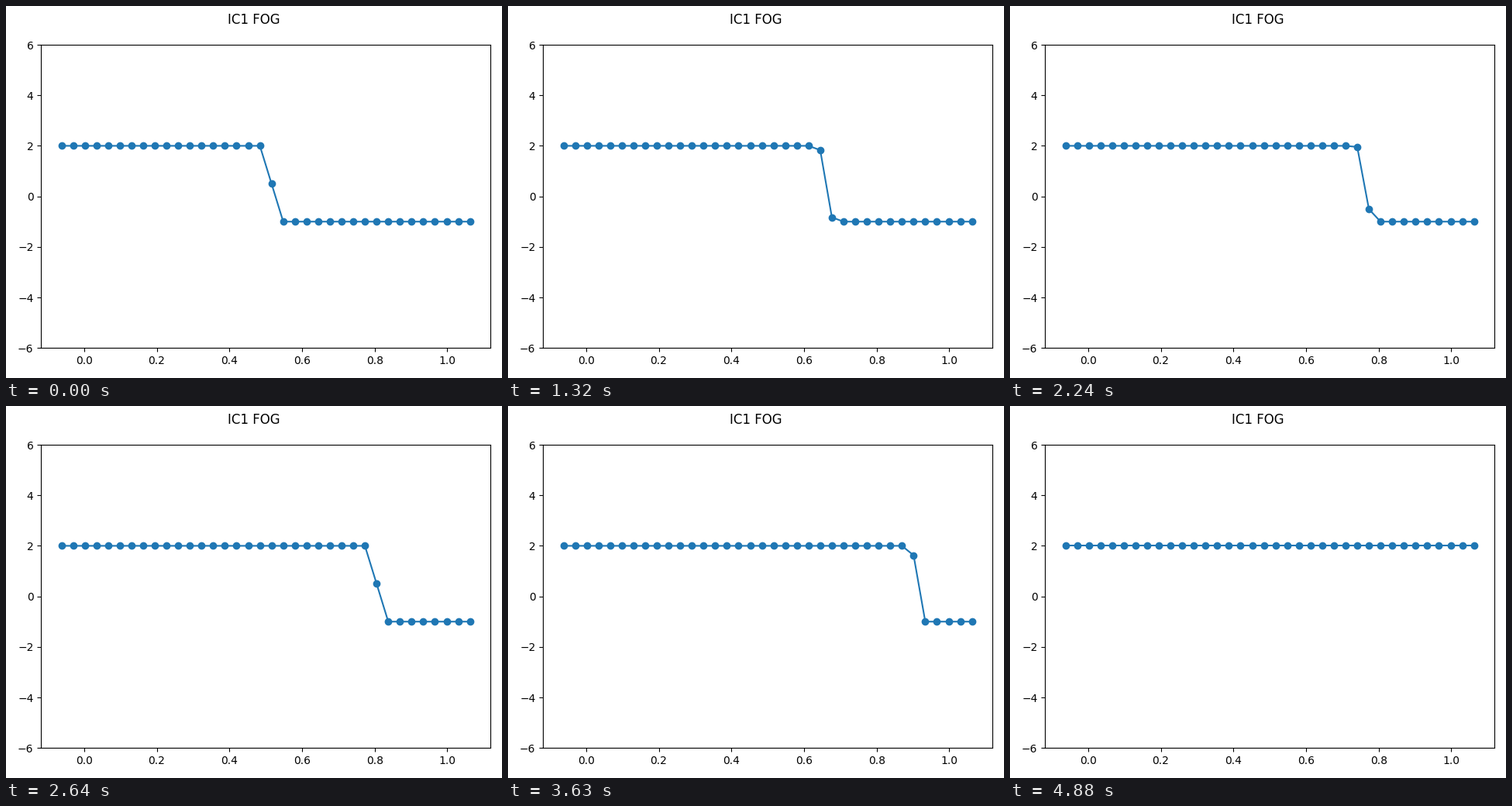
A matplotlib script that plays this animation: 640x480 px, repeating every 7000 ms.

```python
import numpy as np
import matplotlib.pyplot as plt
from matplotlib.animation import FuncAnimation

LOOP_MS = 7000
TICKS = 213
TICKS_PER_STEP = 2
CELLS = 32
GHOSTS = 2
CFL = 0.9
U_LEFT, U_RIGHT = 2.0, -1.0


def godunov_flux(left, right):
    """Exact Riemann flux for Burgers' equation."""
    shock = np.where(left + right > 0, left, right)
    fan = np.clip(0.0, np.minimum(left, right), np.maximum(left, right))
    return 0.5 * np.where(left > right, shock, fan) ** 2


def fill_ghosts(u):
    u[:GHOSTS] = u[GHOSTS]
    u[-GHOSTS:] = u[-GHOSTS - 1]


def step(u):
    ratio = CFL / np.abs(u).max()  # dt / dx
    flux = godunov_flux(u[:-1], u[1:])
    new = u.copy()
    new[1:-1] -= ratio * np.diff(flux)
    fill_ghosts(new)
    return new


margin = GHOSTS / CELLS
x = np.linspace(-margin, 1 + margin, CELLS + 2 * GHOSTS)
cell = np.arange(-GHOSTS, CELLS + GHOSTS)
middle = CELLS // 2
start = np.where(cell < middle, U_LEFT, U_RIGHT)
start[cell == middle] = (U_LEFT + U_RIGHT) / 2

states = [start]
while len(states) * TICKS_PER_STEP < TICKS:
    states.append(step(states[-1]))

fig, ax = plt.subplots(figsize=(6.4, 4.8), dpi=100)
fig.suptitle("IC1 FOG", y=0.982)
line, = ax.plot(x, start, "o-", color="C0")
ax.set_ylim(-6, 6)
fig.tight_layout()
fig.subplots_adjust(top=430 / 480)


def update(i):
    line.set_ydata(states[i // TICKS_PER_STEP])
    return line,


anim = FuncAnimation(fig, update, frames=TICKS, interval=LOOP_MS / TICKS,
                     repeat=True, repeat_delay=0)
plt.show()
```
